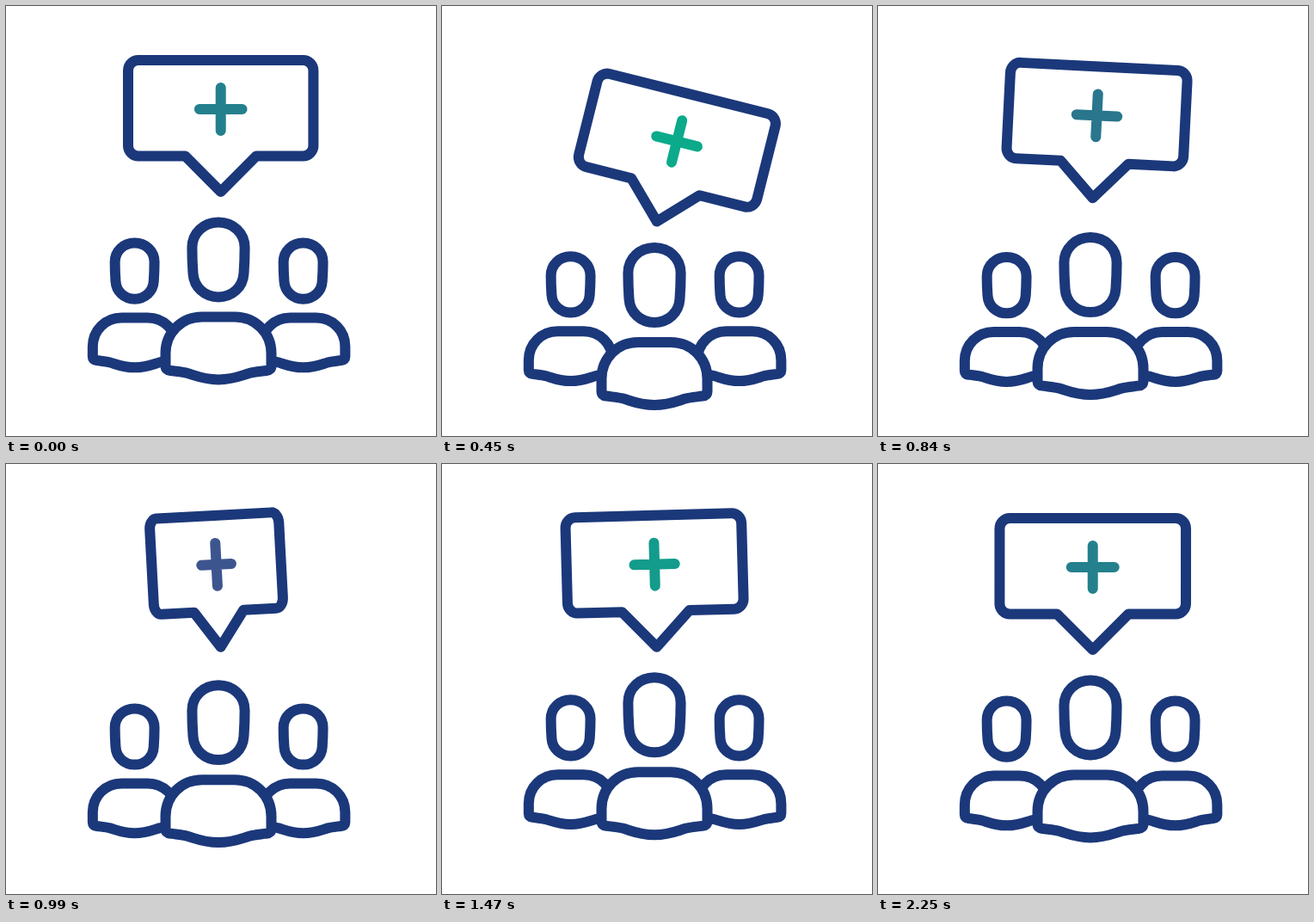
Write an HTML page with a canvas that moves like this. It is 500 by 500 pixels and loops after 2340 ms.

```html
<!DOCTYPE html>
<html lang="en">
<head>
<meta charset="utf-8">
<title>Group conversation</title>
<style>
html, body { margin: 0; width: 100%; height: 100%; overflow: hidden; background: #fff; }
canvas { display: block; }
</style>
</head>
<body>
<canvas id="stage" width="500" height="500"></canvas>
<script>
const ctx = document.getElementById('stage').getContext('2d');
const LOOP = 2340, STEP = 30, LAST = 2250;
const NAVY = '#1b387a';
const GREEN = [10, 170, 139], SLATE = [61, 85, 143];
const RADIAN = Math.PI / 180;

const clamp = x => Math.min(1, Math.max(0, x));
const smooth = x => x * x * (3 - 2 * x);
const ramp = (t, from, to) => smooth(clamp((t - from) / (to - from)));

// Each part dips, swings back past its rest and settles.
const leadDrop = t => 30.4 * ramp(t, 0, 500) - 35.2 * ramp(t, 575, 1225) + 4.8 * ramp(t, 1225, 1850);
const sideDrop = t => 17.3 * ramp(t, 0, 550) - 19.9 * ramp(t, 790, 1237) + 2.6 * ramp(t, 1237, 1700);
const bubbleDrop = t => 35.1 * ramp(t, 0, 400) - 42.1 * ramp(t, 400, 1122) + 7 * ramp(t, 1122, 1800);
const bubbleTilt = t => 14.1 * ramp(t, 0, 450) - 21.2 * ramp(t, 450, 1200)
  + 11.1 * ramp(t, 1200, 1740) - 4 * ramp(t, 1740, 2270);
const plusTint = t => ramp(t, -330, 330) - ramp(t, 680, 960)
  + ramp(t, 1220, 1560) - 0.5 * ramp(t, 1800, LAST);

// One full turn about the upright axis, quick at first with a long tail.
function bubbleSpin(t) {
  const left = 1 - clamp((t - 400) / (LAST - 400));
  return 6 + 354 * smooth(1 - left ** 2.27);
}

function scaled(path, x, y) {
  const result = new Path2D();
  result.addPath(path, new DOMMatrix([x, 0, 0, y, 0, 0]));
  return result;
}

function mirrored(half) {
  const whole = new Path2D(half);
  whole.addPath(scaled(whole, -1, 1));
  return whole;
}

// Right halves: people hang from the top of the head or shoulders, the bubble stands on its tip.
const head = mirrored('M0 0 C17 0 30.6 12.5 30.6 29.5 Q30.6 44 29.5 59.5 C28.5 75.5 16 86.9 0 86.9');
const body = mirrored(`M0 0 H19 C43 0 61.5 18.5 61.5 42.5 V57 Q61.5 62 56 62.5
  C49 63.5 42 63.8 36 65.5 C26 68.5 17 72.9 0 72.9`);
const bubble = mirrored(`M0 0 L41.5 -41.5 H96.3 A12 12 0 0 0 108.3 -53.5
  V-141 A12 12 0 0 0 96.3 -153 H0`);
const plus = new Path2D('M-25 -96 H25 M0 -121 V-71');

function outline(path, color = NAVY) {
  ctx.strokeStyle = color;
  ctx.fill(path);
  ctx.stroke(path);
}

function drawPerson(x, headY, bodyY, headSize = 1, bodySize = 1) {
  ctx.setTransform(1, 0, 0, 1, x, headY);
  outline(scaled(head, headSize, headSize));
  ctx.setTransform(1, 0, 0, 1, x, bodyY);
  outline(scaled(body, bodySize, bodySize));
}

function drawBubble(t) {
  const width = Math.cos(bubbleSpin(t) * RADIAN);
  const tint = plusTint(t);
  const color = GREEN.map((g, i) => Math.round(SLATE[i] + (g - SLATE[i]) * tint));
  ctx.setTransform(1, 0, 0, 1, 249.7, 216 + bubbleDrop(t));
  ctx.rotate(bubbleTilt(t) * RADIAN);
  outline(scaled(bubble, width, 1));
  outline(scaled(plus, width, 1), `rgb(${color})`);
}

function draw(t) {
  ctx.setTransform(1, 0, 0, 1, 0, 0);
  ctx.fillStyle = '#fff';
  ctx.fillRect(0, 0, 500, 500);
  ctx.lineWidth = 12;
  ctx.lineCap = ctx.lineJoin = 'round';
  const side = sideDrop(t), lead = leadDrop(t);
  for (const x of [149.6, 345.6]) drawPerson(x, 275.5 + side, 362.5 + side, 0.75, 0.793);
  drawPerson(247, 251.5 + lead, 361.5 + lead);
  drawBubble(t);
}

const start = performance.now();
function tick() {
  const t = (performance.now() - start) % LOOP;
  draw(Math.min(Math.floor(t / STEP) * STEP, LAST));
  requestAnimationFrame(tick);
}
tick();
</script>
</body>
</html>
```
